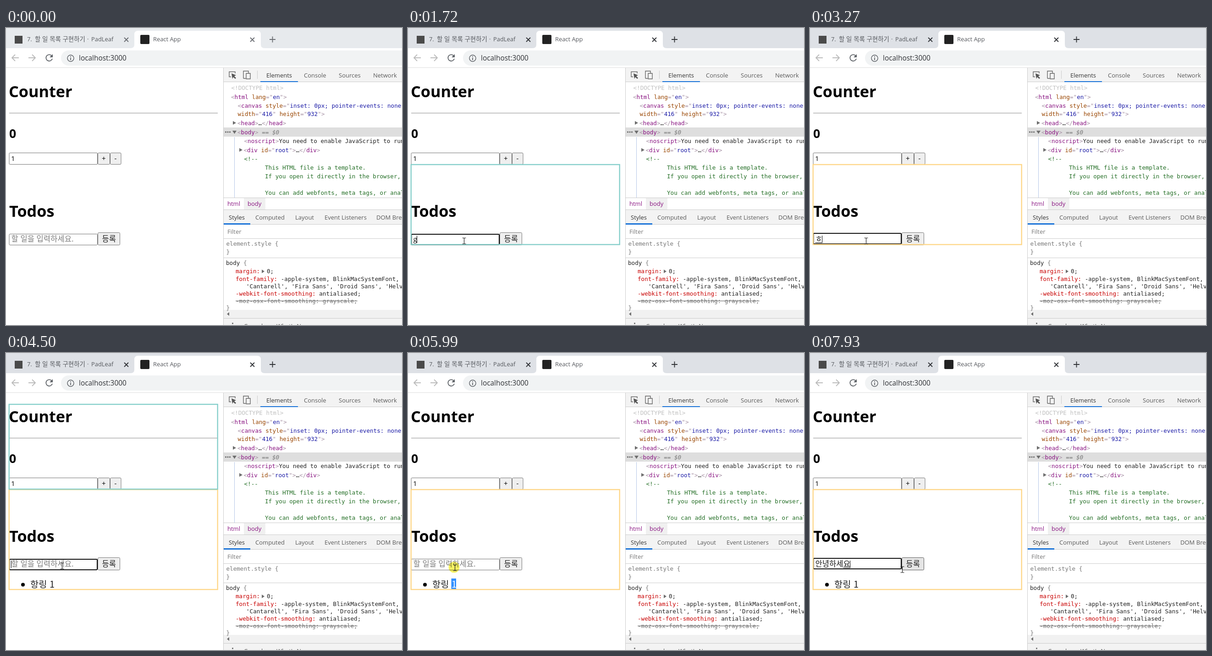
An HTML page for the animation above (8000 ms loop, 864 by 648 pixels).

```html
<!DOCTYPE html>
<html lang="ko">
<head>
<meta charset="utf-8">
<title>Counter and todos</title>
<style>
html, body { margin: 0; width: 100%; height: 100%; overflow: hidden; background: #fff; }
svg { display: block; width: 864px; height: 648px; }
text { white-space: pre; font-family: "Open Sans", "Noto Sans CJK KR", sans-serif; }
.ko { font-family: "Noto Sans CJK KR", "Noto Sans CJK JP", "Noto Sans CJK", sans-serif; font-weight: 300; font-size: 16.6px; }
.tab { font-size: 12.9px; fill: #55585d; }
.dev text { font-size: 13px; fill: #5a5a5a; }
.dev .on { fill: #333; }
.dev .crumb { fill: #881280; }
.code text { font: 12.62px "DejaVu Sans Mono", monospace; fill: #222; }
.code .p { fill: #a894a6; }
.code .t { fill: #881280; }
.code .a { fill: #994500; }
.code .v { fill: #1a1aa6; }
.code .c { fill: #236e25; }
.code .k { fill: #c80000; }
.code .g { fill: #777; }
.head { font-weight: 700; font-size: 34.2px; }
.btn { fill: #efefef; stroke: #767676; }
.line { fill: none; stroke: #ccc; }
.flash { fill: none; stroke-width: 2.4; }
.icon { fill: none; stroke: #5f6368; stroke-width: 1.8; }
</style>
</head>
<body>
<svg viewBox="0 0 864 648">
  <rect width="864" height="648" fill="#fff"/>

  <!-- browser frame -->
  <rect id="strip" width="864" height="44"/>
  <path d="M272 44q8 0 8-8V14q0-8 8-8H548q8 0 8 8V36q0 8 8 8z" fill="#fff"/>
  <rect x="19" y="17" width="17" height="17" fill="#4a4a4a"/>
  <rect x="293" y="15" width="20" height="20" rx="2" fill="#222"/>
  <text class="tab" x="46" y="29">7.</text>
  <text class="tab ko" x="63" y="29" style="font-size:13.4px">할 일 목록 구현하기</text>
  <text class="tab" x="177" y="29">·</text>
  <text class="tab" x="186" y="29">PadLeaf</text>
  <text class="tab" x="321" y="29">React App</text>
  <path id="marks" class="icon" d="M258 21l9 9m0-9l-9 9M533 21l9 9m0-9l-9 9M575 25h13M581.500 18.500v13"/>
  <path class="icon" style="stroke:#bbb" d="M28 65H13m7-7l-7 7 7 7M49 65h15m-7-7l7 7-7 7"/>
  <path class="icon" d="M100 61a7 7 0 1 0 1 6"/>
  <path d="M102 57v7h-7z" fill="#5f6368"/>
  <rect x="120" y="49" width="780" height="33" rx="16.500" fill="#f1f3f4"/>
  <circle class="icon" cx="141" cy="66" r="7" style="stroke-width:1.5"/>
  <path class="icon" d="M141 65v5M141 61.500v2"/>
  <text x="159" y="71" font-size="15.400" fill="#303236">localhost:3000</text>
  <path class="line" d="M0 86.500H864" style="stroke:#ddd"/>

  <!-- page -->
  <text class="head" x="6" y="151">Counter</text>
  <path d="M7 185.500H462" stroke="#9a9a9a"/>
  <path d="M7 186.500H462" stroke="#eee"/>
  <text class="head" x="7" y="240" style="font-size:26.5px">0</text>
  <rect x="7" y="272.500" width="192.500" height="25" rx="1.500" fill="#fff" stroke="#767676"/>
  <text x="11" y="290" font-size="15">1</text>
  <rect class="btn" x="200.500" y="272.500" width="26" height="25" rx="2"/>
  <rect class="btn" x="227.500" y="272.500" width="23.500" height="25" rx="2"/>
  <text x="209" y="290" font-size="15">+</text>
  <text x="236.500" y="290" font-size="15">-</text>
  <text class="head" x="7" y="412">Todos</text>
  <rect id="field" rx="2" fill="#fff"/>
  <rect id="add" class="btn" x="200.500" y="446.500" width="48" height="27" rx="2"/>
  <text class="ko" x="209.500" y="466" fill="#222">등록</text>
  <text id="hint" class="ko" x="11.500" y="466" fill="#7d7d7d">할 일을 입력하세요.</text>
  <text id="typed" x="11.500" y="466" fill="#181818"></text>
  <path id="under" stroke="#000"/>
  <path id="caret" stroke="#000"/>
  <g id="item">
    <circle cx="37" cy="505.500" r="4"/>
    <rect id="mark" x="94.500" y="492" width="10.500" height="24" fill="#3390ff"/>
    <text class="ko" x="53" y="512" style="font-size:19.8px" fill="#222">항링 <tspan id="one">1</tspan></text>
  </g>
  <rect id="todoFlash" class="flash" x="6.700" y="298" width="455"/>
  <rect id="counterFlash" class="flash" x="6.700" y="112" width="455" height="185" stroke="#87cfcb"/>

  <!-- inspector -->
  <g class="dev">
    <rect x="475" y="87" width="389" height="561" fill="#fff"/>
    <rect x="475" y="87" width="389" height="30" fill="#f3f3f3"/>
    <rect x="475" y="397" width="389" height="32" fill="#f3f3f3"/>
    <rect x="475" y="217" width="389" height="20" fill="#dedede"/>
    <rect x="519" y="371" width="47" height="25" fill="#f0f0f0"/>
    <rect x="475" y="615" width="389" height="18" fill="#f1f1f1"/>
    <rect x="475" y="634" width="389" height="14" fill="#f3f3f3"/>
    <path class="line" d="M474.500 87V648M475 117.500H864M475 370.500H864M475 396.500H864M475 428.500H864M475 459.500H864M475 501.500H864M475 633.500H864M548.500 93V111"/>
    <path d="M498.500 238V370" stroke="#b5c7e8"/>
    <path d="M555 116h82v2h-82zM475 426h58v3h-58z" fill="#1a73d8"/>
    <path class="icon" style="stroke:#666;stroke-width:1.4" d="M491 106.500h-4V95.500h13V99M518 110V94h11v5M524 99h9v12h-9zM518 110h5"/>
    <path d="M492 99l10 4-4 2 4 4-2 2-4-4-2 4z" fill="#555"/>
    <text class="on" x="568" y="108">Elements</text>
    <text x="650" y="108">Console</text>
    <text x="726" y="108">Sources</text>
    <text x="801" y="108">Network</text>
    <text class="crumb" x="483" y="388">html</text>
    <text class="crumb" x="527" y="388">body</text>
    <text class="on" x="486" y="418">Styles</text>
    <text x="544" y="418">Computed</text>
    <text x="631" y="418">Layout</text>
    <text x="695" y="418">Event Listeners</text>
    <text x="808" y="418">DOM Breakpoints</text>
    <text x="483" y="449" style="fill:#777">Filter</text>
    <text x="519" y="655">Console</text>
    <text x="590" y="655">What's New</text>
    <path d="M495 203l7 4-7 4zM494 224h9l-4.500 7zM509 262l7 4-7 4zM558 527l6 4-6 4zM487 620v8l-5-4z" fill="#6e6e6e"/>
    <path d="M478 227h3m1.500 0h3m1.500 0h3M494.500 643v3" stroke="#666" stroke-width="2.500"/>
  </g>
  <g class="code">
    <text x="491.500" y="134.500" style="fill:#c0c0c0">&lt;!DOCTYPE html&gt;</text>
    <text class="p" x="491" y="155">&lt;<tspan class="t">html</tspan> <tspan class="a">lang</tspan>="<tspan class="v">en</tspan>"&gt;</text>
    <text class="p" x="505.500" y="174">&lt;<tspan class="t">canvas</tspan> <tspan class="a">style</tspan>="<tspan class="v">inset: 0px; pointer-events: none;</tspan></text>
    <text class="p" x="505.500" y="192"><tspan class="a">width</tspan>="<tspan class="v">416</tspan>" <tspan class="a">height</tspan>="<tspan class="v">932</tspan>"&gt;</text>
    <text class="p" x="505" y="212">&lt;<tspan class="t">head</tspan>&gt;<tspan fill="#222">…</tspan>&lt;/<tspan class="t">head</tspan>&gt;</text>
    <text class="p" x="505" y="231.500">&lt;<tspan class="t">body</tspan>&gt;<tspan class="g" font-style="italic"> == $0</tspan></text>
    <text class="p" x="519.500" y="251">&lt;<tspan class="t">noscript</tspan>&gt;<tspan fill="#222">You need to enable JavaScript to run</tspan></text>
    <text class="p" x="518.500" y="271">&lt;<tspan class="t">div</tspan> <tspan class="a">id</tspan>="<tspan class="v">root</tspan>"&gt;<tspan fill="#222">…</tspan>&lt;/<tspan class="t">div</tspan>&gt;</text>
    <text class="c" x="519.500" y="290">&lt;!--</text>
    <text class="c" x="565" y="308.500">This HTML file is a template.</text>
    <text class="c" x="565" y="327.500">If you open it directly in the browser,</text>
    <text class="c" x="565" y="364">You can add webfonts, meta tags, or analytics</text>
    <text class="g" x="480.500" y="474.500">element.style {</text>
    <text class="g" x="480.500" y="493">}</text>
    <text x="480" y="516.500">body <tspan class="g">{</tspan></text>
    <text class="k" x="501" y="535">margin:</text>
    <text x="569" y="535">0;</text>
    <text x="501" y="552"><tspan class="k">font-family:</tspan> -apple-system, BlinkMacSystemFont,</text>
    <text x="524" y="567.500">'Cantarell', 'Fira Sans', 'Droid Sans', 'Helvetica</text>
    <text x="501" y="583.500"><tspan class="k">-webkit-font-smoothing:</tspan> antialiased;</text>
    <text class="g" x="501" y="599.500" text-decoration="line-through">-moz-osx-font-smoothing: grayscale;</text>
    <text class="g" x="480.500" y="614.500">}</text>
  </g>

  <g id="mouse">
    <circle id="halo" cx="-2" cy="-1" r="12" fill="#f3ec3c" style="mix-blend-mode:multiply" opacity=".8"/>
    <path id="beam" d="M-4-6.500h3l1 1 1-1h3M0-5.500v11M-4 6.500h3l1-1 1 1h3" fill="none" stroke="#222" stroke-width="1.200"/>
    <path id="arrow" d="M0-8V8l4-4 3 6 2-1-3-6h6z" fill="#fff" stroke="#222"/>
  </g>
</svg>
<script>
const LOOP = 8000;
const el = {};
document.querySelectorAll("[id]").forEach(e => el[e.id] = e);

// text in the field; "_" after a syllable marks it as still being composed
const typing = [
  [0, ""], [1720, "g"], [1950, "gk"], [2020, "gkf"], [2100, "gkfd"],
  [2500, "gkf"], [2650, "gk"], [2880, "g"], [3030, ""],
  [3200, "ㅎ_"], [3350, "하_"], [3420, "항_"], [3500, "항리_"], [3570, "항링_"],
  [3720, "항링 "], [3880, "항링 1"], [4420, ""],
  [6530, "ㅇ_"], [6600, "아_"], [6680, "안_"], [6840, "안ㄴ_"], [6920, "안녀_"],
  [7000, "안녕_"], [7080, "안녕ㅎ_"], [7160, "안녕하_"], [7310, "안녕핫_"],
  [7390, "안녕하세_"], [7470, "안녕하세요_"]
];
const tints = [[0, "none"], [1720, "#87cfcb"], [1950, "#c1d3b6"], [2020, "#e2d5a3"], [2100, "#fed78a"]];
const path = [
  [70, 246, 562], [470, 122, 464], [4740, 122, 464], [5290, 97, 506], [5690, 97, 506],
  [5990, 102, 468], [6220, 113, 464], [7770, 113, 464], [7930, 201, 472]
];

const at = (list, t) => list.filter(s => s[0] <= t).pop()[1];
const within = (t, a, b) => t >= a && t < b;
const show = (e, on) => e.style.display = on ? "" : "none";
const set = (e, attrs) => { for (const k in attrs) e.setAttribute(k, attrs[k]); };

function position(t) {
  const i = path.findIndex(p => p[0] > t);
  if (i < 0) return path[path.length - 1].slice(1);
  if (i === 0) return path[0].slice(1);
  const [a, b] = [path[i - 1], path[i]];
  const u = (t - a[0]) / (b[0] - a[0]);
  return [a[1] + (b[1] - a[1]) * u, a[2] + (b[2] - a[2]) * u];
}

function drawField(t) {
  const raw = at(typing, t), text = raw.replace("_", "");
  const korean = /[ㄱ-힣]/.test(text);
  const focus = within(t, 470, 5290) || t >= 6220;
  const inset = focus ? .5 : 0;
  set(el.field, {
    x: 7 + inset, y: (korean ? 447.5 : 449.5) + inset,
    width: 192.5 - 2 * inset, height: 24 - 2 * inset,
    stroke: focus ? "#101010" : "#767676", "stroke-width": focus ? 2 : 1
  });
  el.typed.textContent = text;
  el.typed.setAttribute("class", korean ? "ko" : "");
  el.typed.style.fontSize = korean ? "" : "15px";
  show(el.hint, !text);
  const end = text ? 11.5 + el.typed.getComputedTextLength() : 11;
  const x = Math.floor(end) + .5;
  set(el.caret, { d: `M${x} 453V469` });
  show(el.caret, focus);
  const composing = raw !== text;
  show(el.under, composing);
  if (composing) set(el.under, { d: `M${end - el.typed.getSubStringLength(text.length - 1, 1)} 468.5H${end}` });
}

function draw(t) {
  const active = t >= 710, added = t >= 4420, selected = within(t, 5610, 6220), hover = t >= 7850;
  set(el.strip, { fill: active ? "#dee1e6" : "#e7eaed" });
  set(el.marks, { style: `stroke:${active ? "#303236" : "#6a6d72"}` });
  drawField(t);

  show(el.item, added);
  show(el.mark, selected);
  set(el.one, { fill: selected ? "#fff" : "#222" });
  set(el.todoFlash, { stroke: at(tints, t), height: added ? 218 : 174.5 });
  show(el.counterFlash, within(t, 4420, 4740) || within(t, 5440, 5840));
  set(el.add, { style: hover ? "fill:#e5e5e5;stroke:#5a5a5a" : "" });

  const [x, y] = position(t), blank = t < 470 && y > 476;
  show(el.mouse, t >= 70);
  set(el.mouse, { transform: `translate(${Math.round(x) + .5} ${Math.round(y) + .5})` });
  show(el.halo, t < 710 || within(t, 4740, 6220));
  show(el.beam, !blank);
  show(el.arrow, blank);
}

const start = performance.now();
function tick() {
  draw((performance.now() - start) % LOOP);
  requestAnimationFrame(tick);
}
tick();
</script>
</body>
</html>
```
